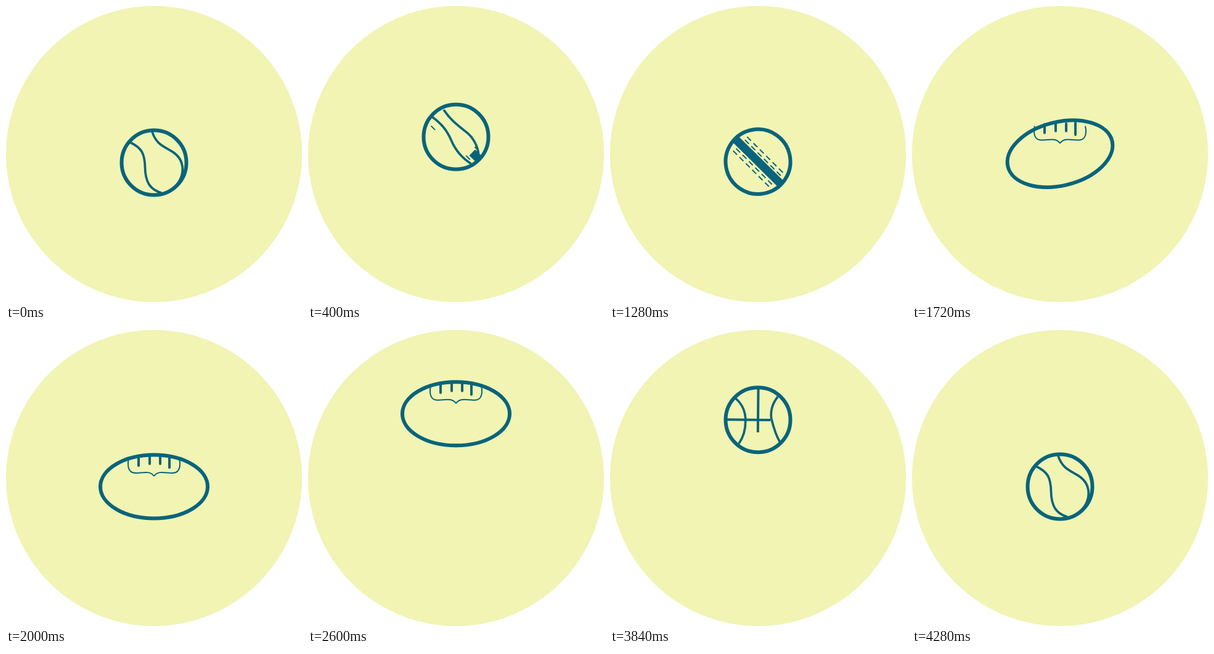
Recreate the animation shown at these times as an HTML page with a canvas. Size 480x480 px, loop 4.72 s.

```html
<!DOCTYPE html>
<html lang="en">
<head>
<meta charset="utf-8">
<title>Bouncing balls</title>
<style>
html, body { margin: 0; width: 100%; height: 100%; overflow: hidden; background: #fff; }
canvas { display: block; width: 480px; height: 480px; }
</style>
</head>
<body>
<canvas id="stage"></canvas>
<script>
const LOOP = 4720, STEP = 40;
const STARTS = [67, 1267, 2427, 3587];
const INK = '#07647c', PAPER = '#f1f4b3';

const canvas = document.getElementById('stage');
const scale = window.devicePixelRatio || 1;
canvas.width = canvas.height = 480 * scale;
const ctx = canvas.getContext('2d');

const clamp = v => Math.min(1, Math.max(0, v));
const part = (s, a, b) => clamp((s - a) / (b - a));
const smooth = (s, a, b) => { const p = part(s, a, b); return p * p * (3 - 2 * p); };
const easeOut = (s, a, b) => 1 - (1 - part(s, a, b)) ** 2;
const mix = (a, b, k) => a + (b - a) * k;
const mixAll = (a, b, k) => a.map((v, i) => mix(v, b[i], k));

// Seams: start point and two cubic segments, relative to the ball centre
const straight = (x0, y0, x1, y1) =>
  Array.from({ length: 7 }, (_, i) => [mix(x0, x1, i / 6), mix(y0, y1, i / 6)]).flat();
const mirror = pts => pts.map((v, i) => i % 2 ? v : -v);
const arc = [-37, -36, -27, -27, -21, -14, -21, 0, -21, 14, -27, 27, -37, 37];
const TENNIS = [
  [-39, -33, -20, -24, -15, -15, -14.5, 8, -14, 32, -6, 44, 12, 49],
  [-3, -50, 3, -32, 12, -28, 26, -20, 54, -5, 50, 24, 32, 41]
];
const BAND = [straight(-39.4, -32.6, 33.6, 39.4), straight(-32.6, -39.4, 40.4, 32.6)];
const ARCS = [arc, mirror(arc)];
const BRACE = [-41, -45, -43, -38, -43, -26, -35, -23, -26, -19, -8, -29, 0, -17];
const LACES = [[-25, -48, -34], [-7, -48, -37], [10, -49, -37], [25, -50, -31]];

// Vertical centre of the ball, s ms into a bounce
function height(s) {
  if (s < 195) return mix(254, 131.5, smooth(s, 0, 195));
  if (s < 365) return mix(131.5, 254, part(s, 195, 365) ** 2);
  if (s < 525) return mix(254, 229, smooth(s, 365, 525));
  return mix(229, 254, smooth(s, 525, 690));
}

function line(x0, y0, x1, y1, width, p = 1) {
  if (p <= 0) return;
  ctx.lineWidth = width;
  ctx.beginPath();
  ctx.moveTo(x0, y0);
  ctx.lineTo(mix(x0, x1, p), mix(y0, y1, p));
  ctx.stroke();
}

function curve(c, width, p = 1, length = 90) {
  if (p <= 0) return;
  ctx.lineWidth = width;
  ctx.setLineDash(p < 1 ? [length * p, 999] : []);
  ctx.beginPath();
  ctx.moveTo(c[0], c[1]);
  ctx.bezierCurveTo(...c.slice(2, 8));
  ctx.bezierCurveTo(...c.slice(8));
  ctx.stroke();
  ctx.setLineDash([]);
}

function outline(a, b, tilt) {
  ctx.lineWidth = 6;
  ctx.beginPath();
  ctx.ellipse(0, 0, a, b, tilt * Math.PI / 180, 0, Math.PI * 2);
  ctx.stroke();
}

const seams = (from, to, k) => from.forEach((c, i) => curve(mixAll(c, to[i], k), 3.7));

function cricket(p) {
  line(37, 36, -36, -36, 13.5, p);
  ctx.save();
  ctx.rotate(Math.PI / 4);
  ctx.setLineDash([9, 5.6]);
  for (const side of [-1, 1]) {
    line(-41, 16 * side, 41, 16 * side, 2, p);
    line(42, 10 * side, -40, 10 * side, 2, p);
  }
  ctx.restore();
}

function rugby(p) {
  if (p <= 0) return;
  curve(BRACE, 2, p, 60);
  curve(mirror(BRACE), 2, p, 60);
  ctx.lineCap = 'round';
  for (const [x, top, end] of LACES) line(x, top, x, end, 4, p);
  ctx.lineCap = 'butt';
}

function basket(p, tilt, arcs) {
  ctx.save();
  ctx.rotate(tilt * Math.PI / 180);
  line(0, -51, 0, 51, 4, p);
  line(-51, 0, 51, 0, 4, p);
  if (arcs) ARCS.forEach(c => curve(c, 3.7, p));
  ctx.restore();
}

const scenes = [
  s => {
    const k = smooth(s, 190, 450);
    if (k < 1 || s < 530) seams(TENNIS, BAND, k);
    cricket(smooth(s, 270, 530));
    outline(52.5, 52.5, 0);
  },
  s => {
    const k = smooth(s, 170, 430);
    cricket(1 - smooth(s, 170, 330));
    rugby(smooth(s, 250, 440));
    outline(mix(52.5, 87, k), mix(52.5, 51.5, k), -55 * (1 - easeOut(s, 190, 720)));
  },
  s => {
    const k = smooth(s, 180, 430);
    rugby(1 - smooth(s, 180, 330));
    basket(smooth(s, 260, 500), mix(-45, 0.6, easeOut(s, 190, 720)), true);
    outline(mix(87, 52.5, k), mix(51.5, 52.5, k), 0);
  },
  s => {
    basket(1 - smooth(s, 180, 380), 0.6, false);
    seams(ARCS, TENNIS, smooth(s, 190, 480));
    outline(52.5, 52.5, 0);
  }
];

function draw(now) {
  const t = Math.floor((now % LOOP) / STEP) * STEP;
  let i = 3, s = LOOP;
  STARTS.forEach((start, n) => { if (t >= start) { i = n; s = t - start; } });

  ctx.setTransform(scale, 0, 0, scale, 0, 0);
  ctx.fillStyle = '#fff';
  ctx.fillRect(0, 0, 480, 480);
  ctx.fillStyle = PAPER;
  ctx.beginPath();
  ctx.arc(240, 240, 240, 0, Math.PI * 2);
  ctx.fill();

  ctx.strokeStyle = INK;
  ctx.translate(240, height(s));
  scenes[i](s);
}

const begin = performance.now();
function tick() {
  draw(performance.now() - begin);
  requestAnimationFrame(tick);
}
tick();
</script>
</body>
</html>
```
